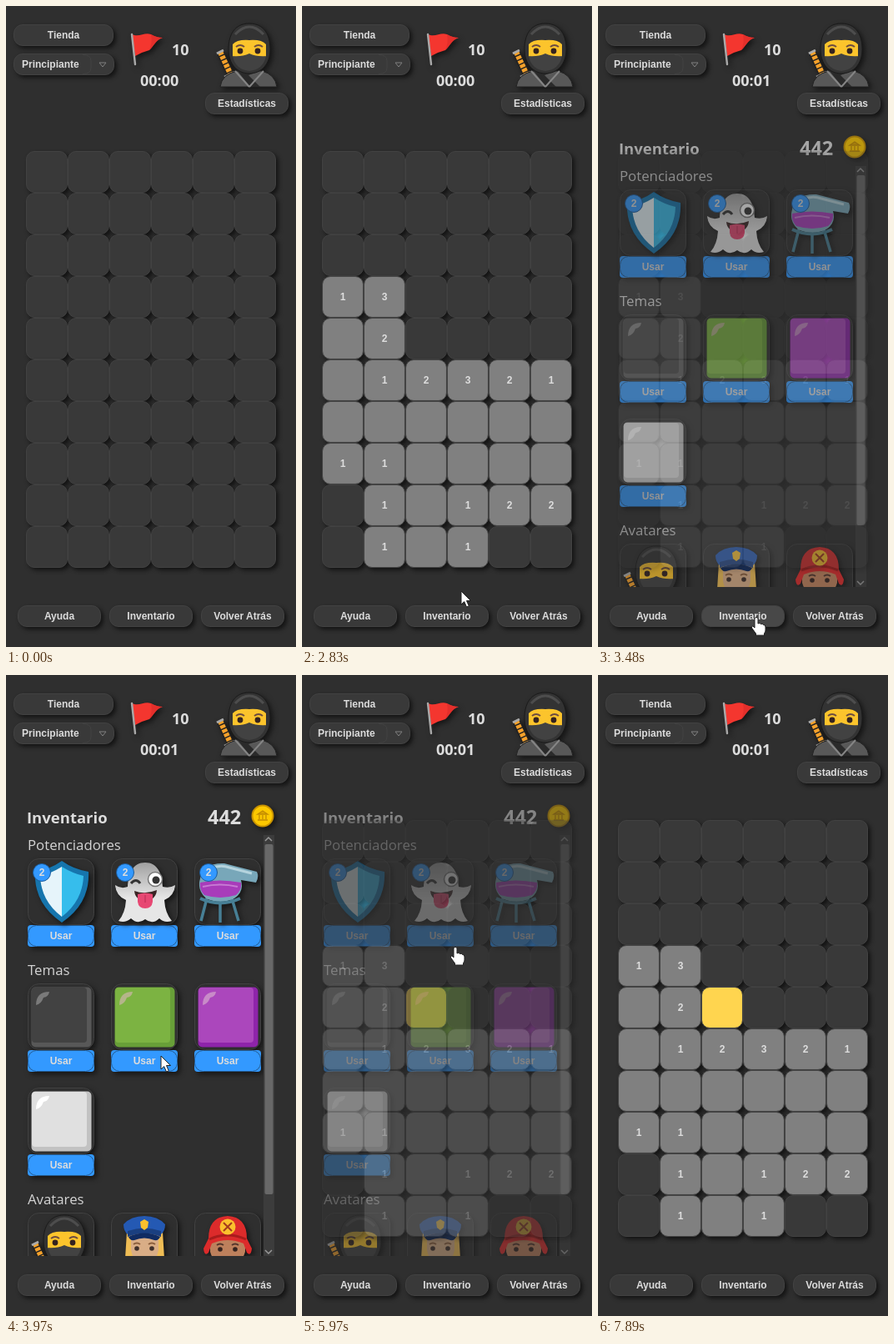
An HTML page for the animation above (8 s loop, 348 by 769 pixels).

```html
<!DOCTYPE html>
<html lang="es">
<head>
<meta charset="utf-8">
<style>
  html, body { margin: 0; width: 100%; height: 100%; overflow: hidden; background: #2f2f2f; }
  #stage { position: relative; width: 348px; height: 769px; overflow: hidden; background: #2f2f2f;
    font: bold 12px "Liberation Sans", Arial, sans-serif; color: #ddd; }
  svg { position: absolute; left: 0; top: 0; }
  .button, .cell { position: absolute; box-sizing: border-box; text-align: center;
    background: #393939; border: 1px solid #424242; box-shadow: 3px 3px 5px #141414; }
  .button { height: 26px; line-height: 24px; border-radius: 11px; }
  .button.hover { background: #484848; }
  .cell { width: 50px; height: 50px; line-height: 48px; border-radius: 10px; }
  .cell.hover { background: #404040; }
  .cell.pressed { background: #444; border-color: #333; box-shadow: inset 3px 3px 6px #151515; }
  .cell.open { background: #808080; border-color: #454545; }
  .cell.gold { background: #ffd54f; border-color: #454545; }
  .big { font-family: "Open Sans", "Noto Sans", sans-serif; font-weight: bold; fill: #ddd; }
  .section { font: 16.8px "Open Sans", "Noto Sans", sans-serif; fill: #d4d4d4; }
  .label { font: bold 12px "Liberation Sans", Arial, sans-serif; fill: #ddd; text-anchor: middle; }
  .shadow { filter: drop-shadow(3px 3px 3px #151515); }
</style>
</head>
<body>
<div id="stage">
  <svg width="348" height="769">
    <defs>
      <clipPath id="scroll"><path d="M0 185H309V697H0Z"/></clipPath>
      <linearGradient id="sheet" x2="0" y2="1"><stop stop-color="#a0a0a0"/><stop offset=".6" stop-color="#e6e6e6"/></linearGradient>
      <g id="ninja">
        <path d="M4 34L16 60" stroke="#222" stroke-width="9"/>
        <path d="M4 34L16 60" stroke="#f5a12b" stroke-width="6.500" stroke-dasharray="4 1.5"/>
        <path d="M0 36L8 32" stroke="#aaa" stroke-width="3"/>
        <path d="M9 64L22 58" stroke="#888" stroke-width="3"/>
        <path d="M4 76Q6 61 24 57H54Q70 61 72 76Z" fill="#585858" stroke="#222"/>
        <path d="M24 56L40 76H52L38 62 54 56Z" fill="#2a2a2a"/>
        <path d="M22 57L39 76M56 57L39 76" stroke="#858585" stroke-width="2"/>
        <path d="M39 0C57 0 64 14 64 31C64 48 54 60 39 60C24 60 14 48 14 31C14 14 21 0 39 0Z" fill="#333" stroke="#1b1b1b"/>
        <path d="M22 13Q39-5 56 13" fill="none" stroke="#4d4d4d" stroke-width="3"/>
        <path d="M19 25Q24 19 39 20Q54 19 59 25V40Q48 41 39 37Q30 41 19 40Z" fill="#fcc42c"/>
        <path d="M19 39Q30 40 39 36Q48 40 59 39Q56 55 39 57Q22 55 19 39Z" fill="#424242"/>
        <path d="M23 28Q28 24 33 28M45 28Q50 24 55 28" fill="none" stroke="#6d4c41" stroke-width="2"/>
        <circle cx="28" cy="33" r="3.4" fill="#35231f"/><circle cx="49" cy="33" r="3.4" fill="#35231f"/>
      </g>
    </defs>
    <g class="shadow">
      <path d="M151 34C160 38 166 31 174 34Q181 38 188 38C178 42 178 48 172 53Q164 55 155 60Z" fill="#f4362f"/>
      <path d="M174 34Q181 38 188 38C178 42 178 48 172 53Q176 44 174 34Z" fill="#d92c2a" opacity=".6"/>
      <path d="M151 34L155 70" stroke="#a9a9a9" stroke-width="2.4" stroke-linecap="round"/>
    </g>
    <text class="big" x="199" y="59" font-size="18">10</text>
    <text class="big" id="clock" x="161" y="96" font-size="18"></text>
    <use class="shadow" href="#ninja" x="253" y="21"/>
  </svg>
  <div id="buttons"></div>
  <svg width="348" height="769" fill="none">
    <path d="M92 58.500Q102 58.500 102 66V74Q102 81.500 92 81.500" stroke="#424242"/>
    <path d="M112 68H120L116 73Z" stroke="#808080"/>
  </svg>

  <svg id="inventory" width="348" height="769">
    <text class="big" x="25" y="178" font-size="18.5">Inventario</text>
    <text class="big" x="242" y="179" font-size="23.5">442</text>
    <g class="shadow">
      <circle cx="308" cy="169" r="12.5" fill="#fcc800" stroke="#c99300" stroke-width="2"/>
      <path d="M302 167L308 163 314 167ZM304 168V173M308 168V173M312 168V173M302 174H314" fill="#dba400" stroke="#c28c00" stroke-width="1.3"/>
    </g>
    <path d="M309 192H322V697H309Z" fill="#3c3c3c"/>
    <rect x="310.500" y="203" width="10" height="420" rx="2" fill="#686868"/>
    <path d="M311 199L315 195 319 199M311 690L315 694 319 690" fill="none" stroke="#999" stroke-width="1.5"/>
    <g clip-path="url(#scroll)">
      <text class="section" x="26" y="210">Potenciadores</text>
      <text class="section" x="26" y="360">Temas</text>
      <text class="section" x="26" y="635">Avatares</text>
      <g id="cards"></g>
      <g class="shadow">
        <path d="M67 223Q81 233 99 236Q101 274 67 297Q33 274 35 236Q53 233 67 223Z" fill="#1675ad"/>
        <path d="M67 230Q54 238 41 241Q42 271 67 290Z" fill="#e6f4fa"/>
        <path d="M67 230Q80 238 93 241Q92 271 67 290Z" fill="#36bdec"/>
      </g>
      <g class="shadow">
        <path d="M167 225C182 225 187 238 188 254Q197 256 203 252Q202 265 190 270Q191 286 199 295Q190 298 184 292Q176 300 167 293Q158 300 150 292Q143 298 135 295Q143 286 144 270Q132 265 131 252Q138 257 146 254C147 238 152 225 167 225Z" fill="url(#sheet)"/>
        <circle cx="179" cy="245" r="8.500" fill="#fff" stroke="#777" stroke-width="1.5"/><circle cx="180" cy="246" r="4.500" fill="#333"/>
        <path d="M150 250Q156 243 161 250" fill="none" stroke="#333" stroke-width="3"/>
        <path d="M154 259Q167 264 181 258Q180 270 167 271Q155 270 154 259Z" fill="#3b2525"/>
        <path d="M158 263Q167 260 176 263V272Q175 280 167 280Q159 280 158 272Z" fill="#e74873"/><path d="M167 264V273" stroke="#b82c55"/>
      </g>
      <g class="shadow">
        <path d="M241 268L234 295M257 272V297M271 268L279 295" stroke="#477f95" stroke-width="3.500"/>
        <path d="M233 244Q236 225 262 226L301 236Q304 242 300 249L282 246Q286 260 274 268Q257 276 240 268Q229 258 233 244Z" fill="#78a7b9"/>
        <path d="M233 249Q256 244 282 249Q283 258 276 264Q257 270 238 264Q232 258 233 249Z" fill="#a83cba"/>
        <path d="M236 254Q257 249 278 254" fill="none" stroke="#c77bd4" stroke-width="2"/>
        <path d="M246 232Q257 227 268 231L295 238" fill="none" stroke="#b5d4de" stroke-width="3"/>
        <path d="M233 268Q257 279 281 268" fill="none" stroke="#477f95" stroke-width="4"/>
      </g>
      <g id="badges"></g>
      <use class="shadow" href="#ninja" x="31" y="648"/>
      <g class="shadow">
        <path d="M145 668H188L190 700H143Z" fill="#efbd55"/>
        <path d="M150 670H183V690Q180 706 166 706Q153 706 150 690Z" fill="#d9ad86"/>
        <path d="M141 659Q150 649 166 649Q182 649 191 659Q191 667 186 671Q166 664 146 671Q141 667 141 659Z" fill="#2459b3"/>
        <path d="M146 667Q166 660 186 667V674Q166 666 146 674Z" fill="#1a3f80"/>
        <path d="M147 674Q166 665 185 674Q183 679 178 678Q166 673 154 678Q149 679 147 674Z" fill="#102b62"/>
        <path d="M166 653L171 656 170 663 166 666 162 663 161 656Z" fill="#fbc02d"/>
        <path d="M153 683Q157 680 161 683M171 683Q175 680 179 683" fill="none" stroke="#8b5e3c" stroke-width="2"/>
        <circle cx="157" cy="688" r="2.800" fill="#40302a"/><circle cx="175" cy="688" r="2.800" fill="#40302a"/>
      </g>
      <g class="shadow">
        <path d="M245 672H287V692Q282 709 266 709Q250 709 245 692Z" fill="#bd805c"/>
        <path d="M243 676Q243 650 266 649Q289 650 289 676L295 688Q294 698 289 693L285 682Q266 674 247 682L243 693Q238 698 237 688Z" fill="#dc2b2b"/>
        <path d="M244 677Q266 667 288 677" fill="none" stroke="#a91c1c" stroke-width="3"/>
        <circle cx="266" cy="662" r="9.500" fill="#fbc02d"/>
        <path d="M261 657L271 667M271 657L261 667" stroke="#a33a1c" stroke-width="2"/>
        <path d="M253 684Q257 681 261 684M271 684Q275 681 279 684" fill="none" stroke="#52342b" stroke-width="2"/>
        <circle cx="257" cy="689" r="2.800" fill="#35231f"/><circle cx="275" cy="689" r="2.800" fill="#35231f"/>
      </g>
    </g>
  </svg>

  <div id="board"></div>
  <svg width="348" height="769">
    <g id="cursor" stroke="#222" stroke-width="1" stroke-linejoin="round" fill="#fff">
      <circle id="click" r="12" fill="#a09c28" stroke="none"/>
      <path id="arrow" d="M0 0V16L3.700 12.600 6.500 19 9.300 17.800 6.500 11.500H11.500Z"/>
      <path id="hand" transform="translate(0 -1)" d="M-2 1.500Q0-1 2 1.500V8Q4 6.500 5.500 8.500Q7.500 7.500 8.500 9.500Q11 9 11 12V16Q11 18 9.500 19.500V22H-.5V20L-5.500 13Q-6 10.500-4 11L-2 13Z"/>
    </g>
  </svg>
</div>
<script>
const LOOP = 8000, STEP = 82.8;
const $ = id => document.getElementById(id);
const show = (id, on) => { $(id).style.display = on ? '' : 'none'; };
const between = (t, a, b) => t >= a && t < b;
const ramp = (t, start, length) => Math.min(1, Math.max(0, (t - start) / length));

function addBox(parent, className, x, y, text = '', style = '') {
  const box = document.createElement('div');
  box.className = className;
  box.textContent = text;
  box.style.cssText = `left:${x}px;top:${y}px;${style}`;
  return $(parent).appendChild(box);
}

addBox('buttons', 'button', 9, 22, 'Tienda', 'width:120px');
addBox('buttons', 'button', 9, 57, 'Principiante', 'width:121px;text-align:left;padding-left:9px');
addBox('buttons', 'button', 239, 104, 'Estadísticas', 'width:100px');
const footerX = i => 14 + 110 * i;
const footer = ['Ayuda', 'Inventario', 'Volver Atrás'].map((text, i) =>
  addBox('buttons', 'button', footerX(i), 719, text, 'width:100px'));

// Dots stay covered, zeros open without a number.
const layout = ['......', '......', '......', '13....', '02....', '012321', '000000', '110000', '.10122', '.101..'].join('');
const cells = [...layout].map((_, i) => addBox('board', 'cell', 24 + i % 6 * 50, 174 + Math.floor(i / 6) * 50));
const FIRST = 39, BONUS = 26;

const card = (x, y) => `<rect class="shadow" x="${x + .5}" y="${y + .5}" width="79" height="79" rx="13" fill="#2f2f2f" stroke="#424242"/>`;
const useButton = (x, y, id = '') => `<g class="shadow" id="${id}"><rect x="${x}" y="${y}" width="80" height="26" rx="4" fill="#39f"/>
  <rect x="${x + .5}" y="${y + .5}" width="79" height="25" rx="10" fill="none" stroke="#24588c"/>
  <text class="label" x="${x + 40}" y="${y + 17}">Usar</text></g>`;
const tile = (x, y, face, edge, shine) => `<rect x="${x + 4.5}" y="${y + 4.5}" width="72" height="72" rx="5" fill="${edge}"/>
  <rect x="${x + 5}" y="${y + 5}" width="66" height="66" rx="4" fill="${face}"/>
  <path d="M${x + 10} ${y + 26}Q${x + 10} ${y + 10} ${x + 26} ${y + 10}Q${x + 25} ${y + 16} ${x + 19} ${y + 17}Q${x + 16} ${y + 25} ${x + 10} ${y + 26}Z" fill="${shine}"/>`;
const themes = [['#424242', '#585858', '#7a7a7a'], ['#7cb342', '#689f38', '#b5b58a'],
  ['#ab47bc', '#8e24aa', '#c88bc8'], ['#e0e0e0', '#c2c2c2', '#fff']];

let cards = '', badges = '';
for (let i = 0; i < 3; i++) {
  const x = 26 + 100 * i;
  cards += card(x, 220) + useButton(x, 300, i === 1 ? 'ghostUse' : '') + card(x, 645);
  badges += `<circle cx="${x + 17}" cy="237" r="10.500" fill="#39f" stroke="#1c5c9c"/><text class="label" x="${x + 17}" y="241">2</text>`;
}
themes.forEach((colors, i) => {
  const x = 26 + i % 3 * 100, y = i < 3 ? 370 : 495;
  cards += card(x, y) + tile(x, y, ...colors) + useButton(x, y + 80);
});
$('cards').innerHTML = cards;
$('badges').innerHTML = badges;
const [useFill, useEdge, useText] = $('ghostUse').children;

// start, duration, from x, y, to x, y, ease-out power
const moves = [
  [560, 780, 315, 772, 198, 503, 3],
  [2415, 830, 198, 503, 190, 734, 3],
  [3690, 900, 190, 734, 184, 327, 3],
  [6840, 1050, 184, 327, 312, 775, 1.4]
];

function cursorAt(t) {
  const [start, length, x0, y0, x1, y1, power] = moves.findLast(move => t >= move[0]) || moves[0];
  const k = 1 - (1 - ramp(t, start, length)) ** power;
  return [x0 + (x1 - x0) * k, y0 + (y1 - y0) * k];
}

function render(t) {
  const [x, y] = cursorAt(t);
  const visible = between(t, 560, 7850);
  const panel = ramp(t, 3300, 260) - ramp(t, 5770, 375);
  const panelOpen = between(t, 3300, 5780);
  const opened = t > 1970, bonus = t > 5780;
  const column = Math.floor((x - 24) / 50), row = Math.floor((y - 174) / 50);
  const onBoard = visible && !panelOpen && between(column, 0, 6) && between(row, 0, 10);
  const target = onBoard ? row * 6 + column : -1;
  let clickable = false;

  cells.forEach((cell, i) => {
    const isOpen = opened && layout[i] !== '.', gold = bonus && i === BONUS;
    const hover = i === target && !isOpen && !gold;
    const pressed = i === FIRST && between(t, 1800, 1970);
    clickable ||= hover;
    cell.className = 'cell' + (isOpen ? ' open' : gold ? ' gold' : pressed ? ' pressed' : hover ? ' hover' : '');
    cell.textContent = isOpen && layout[i] !== '0' ? layout[i] : '';
  });
  footer.forEach((button, i) => {
    const hover = visible && between(y, 719, 745) && between(x, footerX(i), footerX(i) + 100);
    clickable ||= hover;
    button.classList.toggle('hover', hover);
  });
  const onUse = between(t, 4440, 5780);
  clickable ||= onUse;
  useFill.setAttribute('fill', onUse ? '#444' : '#39f');
  useEdge.setAttribute('stroke', onUse ? '#494949' : '#24588c');
  useText.setAttribute('x', onUse ? 164.5 : 166);

  $('clock').textContent = t > 2980 ? '00:01' : '00:00';
  $('inventory').style.opacity = panel;
  $('board').style.opacity = (1 - panel) ** 1.5;
  show('cursor', visible);
  show('hand', clickable);
  show('arrow', !clickable);
  show('click', between(t, 1800, 1970) || between(t, 3300, 3380) || between(t, 5780, 5850));
  $('cursor').setAttribute('transform', `translate(${Math.round(x)} ${Math.round(y)})`);
}

// The screen refreshes about twelve times a second.
function tick() {
  render(Math.floor((performance.now() % LOOP + 8) / STEP) * STEP);
  requestAnimationFrame(tick);
}
tick();
</script>
</body>
</html>
```
